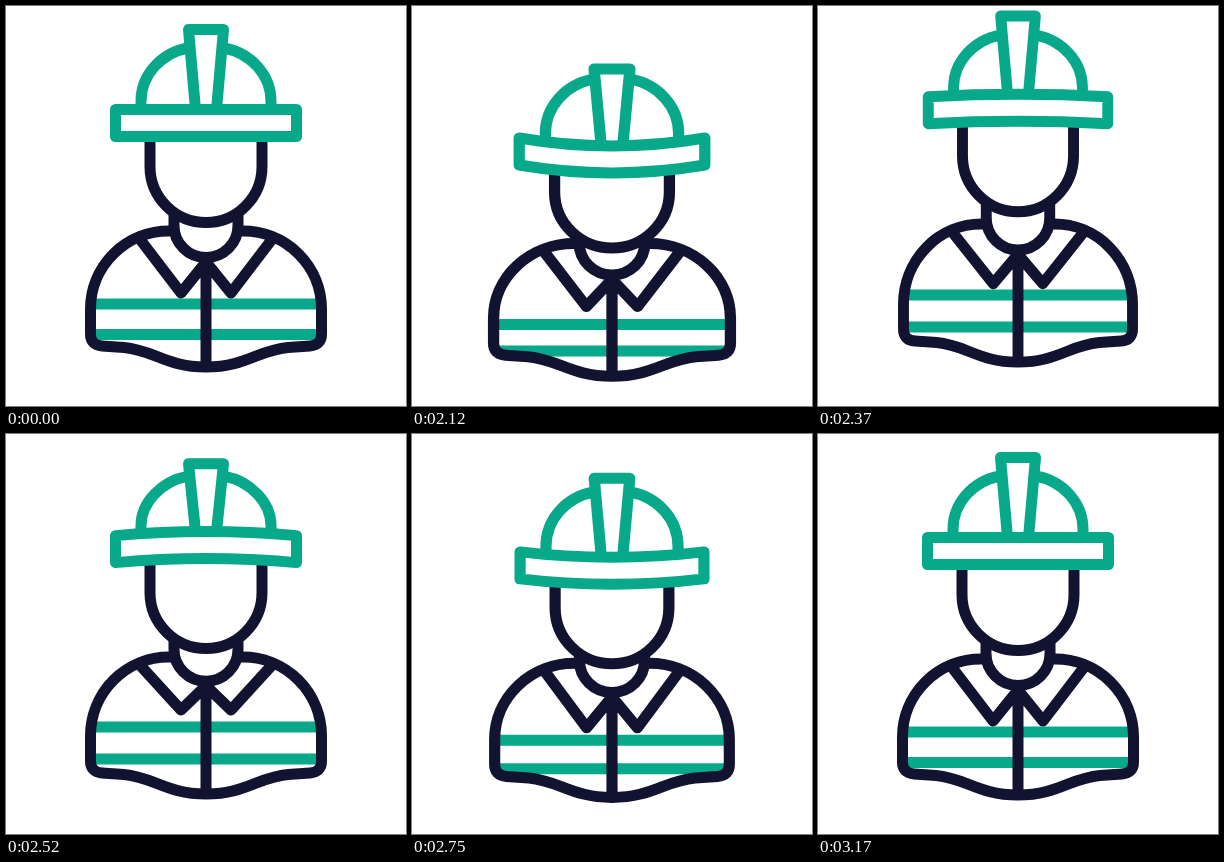
These frames come from a looping animation (400x400 px, 3200 ms). An HTML page:

```html
<!DOCTYPE html>
<html lang="en">
<head>
<meta charset="utf-8">
<title>Worker icon</title>
<style>
  html, body { margin: 0; width: 100%; height: 100%; overflow: hidden; background: #fff; }
  svg { display: block; width: 100%; height: 100%; }
  path { fill: none; stroke-width: 11; stroke-linejoin: round; stroke-linecap: butt; }
  .dark { stroke: #121331; }
  .green { stroke: #08a88a; }
  .round { stroke-linecap: round; }
</style>
</head>
<body>
<svg viewBox="0 0 400 400">
  <defs><clipPath id="inside"><path id="torso"/></clipPath></defs>
  <g id="worker">
    <g clip-path="url(#inside)"><path id="stripes" class="green"/></g>
    <path id="body" class="dark round"/>
    <path id="collar" class="dark"/>
    <path id="neck" class="dark"/>
    <path id="head" class="dark"/>
    <path id="dome" class="green"/>
    <path id="crown" class="green"/>
    <path id="brim" class="green"/>
  </g>
</svg>
<script>
const LOOP = 3200;

// Offsets from rest: time, crown, brim, bend, head, shoulder, tip, chest, hem, widen
const KEYS = [
  [2010, 0, 0, 0, 0, 0, 0, 0, 0, 0],
  [2020, 5, 4.5, 0, 3.5, 3, 3, 3, 3, 1],
  [2110, 40, 29, 8, 26, 13, 14, 21, 9.5, 3],
  [2220, 13, 4, 4, 4, -3, -6, 0, -3, 0],
  [2350, -14, -13, -2, -11, -7, -9, -9, -5, -1],
  [2520, 6, -2, -4, -2, -2, -11, -5, -1, 0],
  [2650, 43, 31, 8.5, 28, 13, 14.5, 22, 9, 3],
  [2850, -3, -3.3, 0.5, -3, -4, -4, -5, -4, 0],
  [2890, -4, -4, -1, -4, -4, -6, -5, -4, -0.5],
  [3040, 3, 3, 0.5, 2, 2, 2, 2, 1.5, 1.2],
  [3100, 0.8, 0.8, 0, 0.6, 0.5, 0.5, 0.6, 0.4, 0.9],
  [3170, 0, 0, 0, 0, 0, 0, 0, 0, 0]
];

const rate = (i, c) => (KEYS[i + 1][c] - KEYS[i][c]) / (KEYS[i + 1][0] - KEYS[i][0]);

// Slope at a key: flat at turning points, so curves never overshoot
function slope(i, c) {
  if (i === 0 || i === KEYS.length - 1) return 0;
  const a = rate(i - 1, c), b = rate(i, c);
  return a * b > 0 ? 2 * a * b / (a + b) : 0;
}

function pose(t) {
  const last = KEYS.length - 1;
  if (t <= KEYS[0][0] || t >= KEYS[last][0]) return KEYS[0].slice(1);
  let i = 0;
  while (t >= KEYS[i + 1][0]) i++;
  const a = KEYS[i], b = KEYS[i + 1], span = b[0] - a[0];
  const u = (t - a[0]) / span, v = 1 - u;
  return a.slice(1).map((_, k) => {
    const c = k + 1;
    return v * v * (1 + 2 * u) * a[c] + u * u * (3 - 2 * u) * b[c]
      + span * u * v * (v * slope(i, c) - u * slope(i + 1, c));
  });
}

const el = id => document.getElementById(id);
const set = (id, d) => el(id).setAttribute('d', d);

function draw(t) {
  const [crown, brim, bend, head, shoulder, tip, chest, hem, widen] = pose(t);
  const sag = dx => brim + bend * (1 - (dx / 90.5) ** 2);
  const throat = 0.85 * chest;
  const k = 1 + widen / 115.5;
  el('worker').setAttribute('transform', `translate(${200 - 200 * k} 0) scale(${k} 1)`);

  // Torso
  const top = 225 + shoulder, side = 303 + hem, low = 328 + hem;
  const foot = 340 + hem, base = 361 + hem, arc = side - top;
  const outline = `M165 ${top}H163A78.5 ${arc} 0 0 0 84.5 ${side}V${low}Q84.5 ${foot - 1} 96 ${foot}`
    + `L118 ${foot + 1.5}C148 ${foot + 4} 160 ${base} 200 ${base}`
    + `S252 ${foot + 4} 282 ${foot + 1.5}L304 ${foot}Q315.5 ${foot - 1} 315.5 ${low}`
    + `V${side}A78.5 ${arc} 0 0 0 237 ${top}H235`;
  set('body', outline);
  set('torso', outline + 'Z');
  const lower = 328.5 + 0.65 * chest + 0.35 * hem;
  set('stripes', `M84 ${298 + chest}H316M84 ${lower}H316`);

  // Collar and zip
  const pin = 256 + throat, lapel = 232 + shoulder, point = 287 + tip;
  set('collar', `M133 ${lapel}L175 ${point}L200 ${pin}L225 ${point}L267 ${lapel}M200 ${pin}V${base}`);

  // Neck and face
  const jaw = 206 + head, bow = 219.5 + throat;
  set('neck', `M168 ${jaw}V${bow}A32 32 0 0 0 232 ${bow}V${jaw}`);
  const hat = 131 + sag(56), cheek = 160.5 + head;
  set('head', `M144 ${hat}V${cheek}A56 56 0 0 0 256 ${cheek}V${hat}`);

  // Helmet
  const rim = 103.5 + sag(65), join = 42 + brim + 0.25 * (crown - brim);
  set('dome', `M135 ${rim}V${rim - 8}C135 ${join + 27} 155 ${join + 5} 182 ${join}`
    + `M265 ${rim}V${rim - 8}C265 ${join + 27} 245 ${join + 5} 218 ${join}`);
  const peak = 23.5 + crown, root = 103.5 + sag(11);
  set('crown', `M189.5 ${root}L182.5 ${peak}H217.5L210.5 ${root}`);
  const up = 103.5 + brim, down = 130.5 + brim;
  set('brim', `M109.5 ${up}Q200 ${up + 2 * bend} 290.5 ${up}V${down}`
    + `Q200 ${down + 2 * bend} 109.5 ${down}Z`);
}

const start = performance.now();
function tick(now) {
  draw(Math.max(0, now - start) % LOOP);
  requestAnimationFrame(tick);
}
draw(0);
requestAnimationFrame(tick);
</script>
</body>
</html>
```
